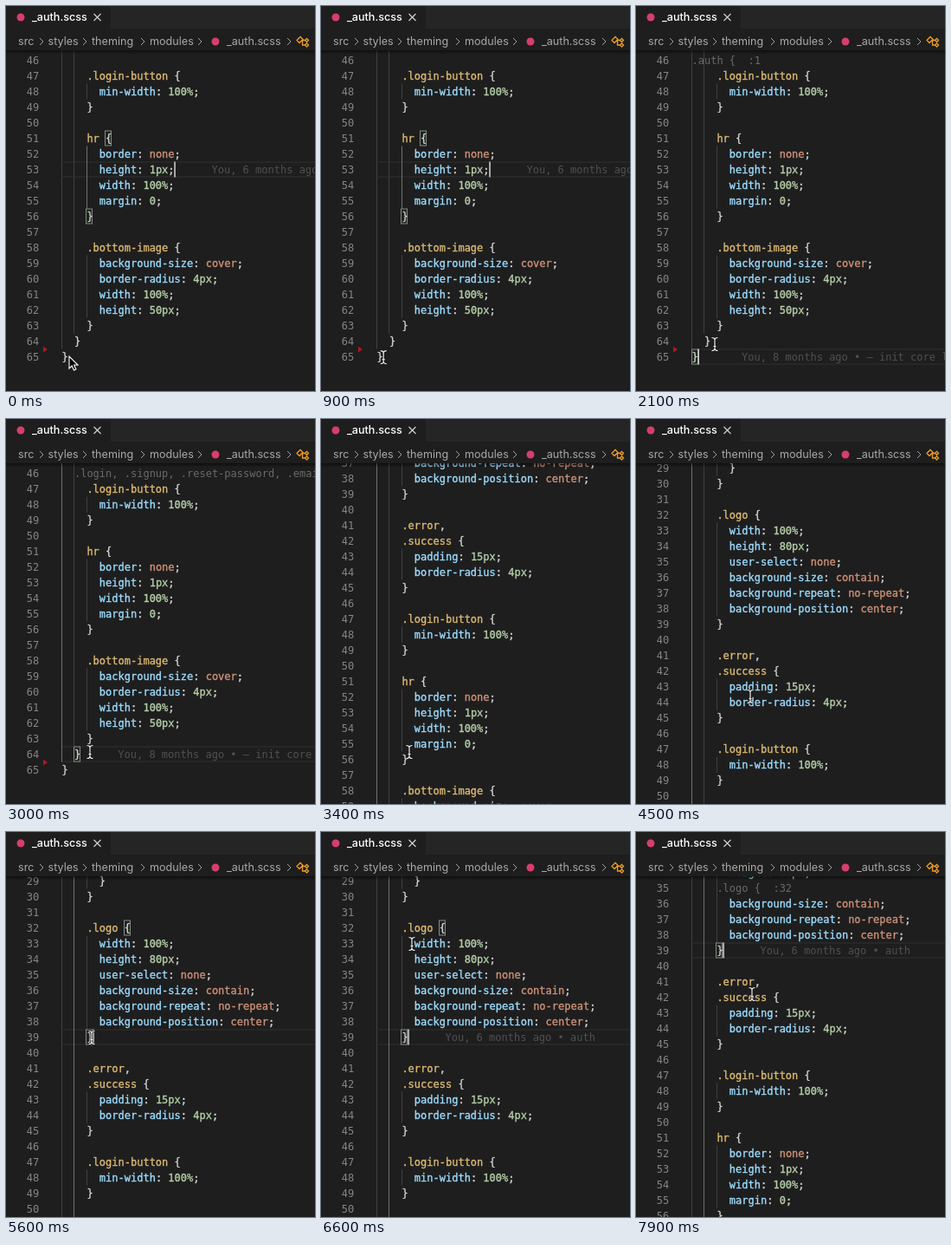
Write an HTML page that moves like this. It is 357x444 px and loops after 8 s.

```html
<!DOCTYPE html>
<html lang="en">
<head>
<meta charset="utf-8">
<title>Bracket matching in an editor</title>
<style>
  html, body { margin: 0; width: 100%; height: 100%; overflow: hidden; background: #1e1e1e; }
  svg { display: block; width: 357px; height: 444px; }
  text { white-space: pre; }
  .code text { font: 12px "DejaVu Sans Mono", "Liberation Mono", monospace; }
  .code tspan { stroke-width: .35px; }
  .ui { font: 12.6px Inter, "Open Sans", sans-serif; fill: #a9a9a9; }
</style>
</head>
<body>
<svg id="stage" viewBox="0 0 357 444">
  <defs>
    <clipPath id="pane"><rect y="51" width="357" height="393"/></clipPath>
    <linearGradient id="shade" x2="0" y2="1">
      <stop stop-color="#000" stop-opacity=".5"/>
      <stop offset="1" stop-color="#000" stop-opacity="0"/>
    </linearGradient>
  </defs>
  <rect width="357" height="444" fill="#1e1e1e"/>
  <g clip-path="url(#pane)"><g class="code" id="code"></g></g>
  <rect y="51" width="357" height="5" fill="url(#shade)"/>

  <rect x="121" width="236" height="26" fill="#252526"/>
  <circle cx="17" cy="13" r="4.5" fill="#d63e6c"/>
  <text class="ui" x="30" y="17" style="fill:#fff;font-weight:500">_auth.scss</text>
  <path d="M101.500 9l8 8m0-8l-8 8" stroke="#d0d0d0" stroke-width="1.200"/>
  <g class="ui" id="crumbs"></g>
  <circle cx="242" cy="41" r="4.500" fill="#d63e6c"/>
  <g fill="none" stroke="#ee9d28" stroke-width="1.300">
    <path d="M336 39.500l4-4 3 3-4 4zM341.500 39.500h4M342.500 39.500v5.500h3"/>
    <path d="M345.500 39.500l2-2 2 2-2 2zM345.500 45l2-2 2 2-2 2z"/>
  </g>

  <g id="arrow">
    <path d="M0 0v14l3.200-3 2.300 5 2.400-1-2.200-5h4.300z" fill="#000" stroke="#fff" stroke-width="1.100"/>
  </g>
  <g id="beam" fill="none">
    <path d="M-3.500-7.500q3 0 3.500 2q.5-2 3.500-2M0-5.500v11M-3.500 7.500q3 0 3.500-2q.5 2 3.500 2M-1.500 2.500h3"
      stroke="#111" stroke-width="2.600"/>
    <path d="M-3.500-7.500q3 0 3.500 2q.5-2 3.500-2M0-5.500v11M-3.500 7.500q3 0 3.500-2q.5 2 3.500 2M-1.500 2.500h3"
      stroke="#f2f2f2" stroke-width="1.200"/>
  </g>
</svg>
<script>
const LOOP = 8000, FIRST = 29, LAST = 65, ROW = 18, CHAR = 7.224, LEFT = 64.5;
const SOURCE = `      }
    }

    .logo {
      width: 100%;
      height: 80px;
      user-select: none;
      background-size: contain;
      background-repeat: no-repeat;
      background-position: center;
    }

    .error,
    .success {
      padding: 15px;
      border-radius: 4px;
    }

    .login-button {
      min-width: 100%;
    }

    hr {
      border: none;
      height: 1px;
      width: 100%;
      margin: 0;
    }

    .bottom-image {
      background-size: cover;
      border-radius: 4px;
      width: 100%;
      height: 50px;
    }
  }
}`.split("\n");

const $ = id => document.getElementById(id);
const code = $("code");
const colX = col => LEFT + col * CHAR;
const rowTop = line => 53.5 + (line - 46) * ROW;

function add(parent, tag, attrs, content) {
  const el = document.createElementNS("http://www.w3.org/2000/svg", tag);
  for (const key in attrs) el.setAttribute(key, attrs[key]);
  if (content) el.textContent = content;
  parent.appendChild(el);
  return el;
}
const show = (el, on) => el.setAttribute("visibility", on ? "visible" : "hidden");
const label = (parent, x, line, fill, content) =>
  add(parent, "text", { x, y: rowTop(line) + 13.2, fill }, content);

function guide(parent, col, from, to, stroke) {
  const x = Math.floor(colX(col)) + .5;
  add(parent, "path", { d: `M${x} ${rowTop(from)}V${rowTop(to + 1)}`, stroke });
}

function colored(line) {
  const rule = line.match(/^(\s+)([\w-]+)(: )([^;]+)(;)$/);
  if (rule) {
    const value = /^\d/.test(rule[4]) ? "#b5cea8" : "#ce9178";
    return [[rule[2], "#9cdcfe"], [rule[3], "#d4d4d4"], [rule[4], value], [";", "#d4d4d4"]];
  }
  const [, name, rest] = line.trim().match(/^([.\w-]*)(.*)$/);
  return [[name, "#dcb972"], [rest, "#d4d4d4"]];
}

// Indent guides, then one state group per caret position, then the text
guide(code, 0, FIRST - 1, 64, "#404040");
guide(code, 2, FIRST - 1, 63, "#404040");
for (const [from, to] of [[28, 29], [33, 38], [43, 44], [48, 48], [52, 55], [59, 62]])
  guide(code, 4, from, to, "#404040");

const states = [
  { start: 0, line: 53, col: 18, boxes: [[51, 7], [56, 4]], guide: [4, 52, 55],
    blame: [237.5, "You, 6 months ago • auth"] },
  { start: 1700, line: 65, col: 1, boxes: [[65, 0]],
    blame: [122, "You, 8 months ago • – init core layout"], open: 1, hint: ".auth {  :1", hintCol: 0 },
  { start: 2450, line: 64, col: 3, boxes: [[64, 2]], guide: [0, 28, 64],
    blame: [129.3, "You, 8 months ago • – init core layout"], open: 2,
    hint: ".login, .signup, .reset-password, .email {", hintCol: 2 },
  { start: 5600, line: 39, col: 5, boxes: [[32, 10], [39, 4]], guide: [2, 28, 63],
    blame: [143.5, "You, 6 months ago • auth"], open: 32, hint: ".logo {  :32", hintCol: 4 }
];
for (const s of states) {
  s.el = add(code, "g", {});
  const y = rowTop(s.line);
  add(s.el, "path", { d: `M64 ${y + .5}H357M64 ${y + 17.5}H357`, stroke: "#303030" });
  if (s.guide) guide(s.el, ...s.guide, "#707070");
  for (const [line, col] of s.boxes)
    add(s.el, "rect", { x: Math.round(colX(col)) - .5, y: rowTop(line) + .5, width: 7, height: 17,
      fill: "#1c251c", stroke: "#888" });
  s.note = label(s.el, s.blame[0], s.line, "#505050", s.blame[1]);
  s.caret = add(s.el, "rect", { x: colX(s.col) - .3, y, width: 1.6, height: ROW, fill: "#c8c8c6" });
}

const rows = {};
SOURCE.forEach((line, i) => {
  const n = FIRST + i;
  const el = rows[n] = label(code, colX(line.search(/\S|$/)), n, "#d4d4d4");
  if (line) for (const [part, fill] of colored(line)) add(el, "tspan", { fill, stroke: fill }, part);
});
for (let n = FIRST - 1; n <= LAST; n++)
  label(code, 38.3, n, "#858585", n).setAttribute("text-anchor", "end");
add(code, "path", { d: "M43 392.500l5 3.500-5 3.500z", fill: "#b3161c" });
const hint = label(code, 0, 0, "#6a6a6a", " ");

const crumbs = [[14, "src"], [48.5, "styles"], [99, "theming"], [166, "modules"], [255, "_auth.scss"]];
for (const [x, name] of crumbs) add($("crumbs"), "text", { x, y: 45.3 }, name);
for (const x of [39, 89, 156, 222, 325])
  add($("crumbs"), "path", { d: `M${x} 37l4 4-4 4`, fill: "none", stroke: "#a0a0a0" });

// Keys are [time, ...values], eased between neighbours
const scrollKeys = [[0, 0], [3080, 0], [3400, 150], [3550, 195], [4250, 300], [6650, 300],
  [7300, 235], [7450, 235], [7880, 200]];
const mouseKeys = [[0, 73, 404], [600, 73, 404], [1300, 71, 407], [1500, 71, 408], [1700, 71, 408],
  [2100, 91, 390], [2450, 97, 384], [3000, 97, 384], [3400, 102, 384], [4300, 128, 328],
  [4500, 132, 320], [5200, 100, 238], [5300, 99, 237], [5600, 99, 237], [6400, 105, 129],
  [6700, 105, 129], [7400, 130, 180], [7900, 134, 187]];

function at(keys, t) {
  const i = keys.findIndex(k => k[0] > t);
  if (i < 0) return keys[keys.length - 1].slice(1);
  const a = keys[i - 1], b = keys[i];
  const p = (t - a[0]) / (b[0] - a[0]), e = p * p * (3 - 2 * p);
  return a.slice(1).map((v, j) => v + (b[j + 1] - v) * e);
}

function render(t) {
  const [scroll] = at(scrollKeys, t);
  code.setAttribute("transform", `translate(0 ${Math.round(scroll)})`);

  const now = states.filter(s => t >= s.start).pop();
  for (const s of states) s.el.setAttribute("display", s === now ? "inline" : "none");
  now.note.setAttribute("display", now.start && t < now.start + 100 ? "none" : "inline");
  // The caret starts blinking with the first click
  now.caret.setAttribute("display", now.start && (t - now.start) % 1000 >= 500 ? "none" : "inline");

  const top = Math.ceil(46 - (scroll + 2) / ROW);
  const hinted = now.hint && now.open < top && rowTop(now.line) + scroll < 440;
  show(hint, hinted);
  for (const n in rows) show(rows[n], !(hinted && n == top));
  if (hinted) {
    hint.textContent = now.hint;
    hint.setAttribute("x", colX(now.hintCol));
    hint.setAttribute("y", rowTop(top) + 13.2);
  }

  const [x, y] = at(mouseKeys, t);
  for (const id of ["arrow", "beam"]) $(id).setAttribute("transform", `translate(${x} ${y})`);
  show($("arrow"), t < 650);
  show($("beam"), t >= 650);
}

function tick() {
  render(performance.now() % LOOP);
  requestAnimationFrame(tick);
}
tick();
</script>
</body>
</html>
```
